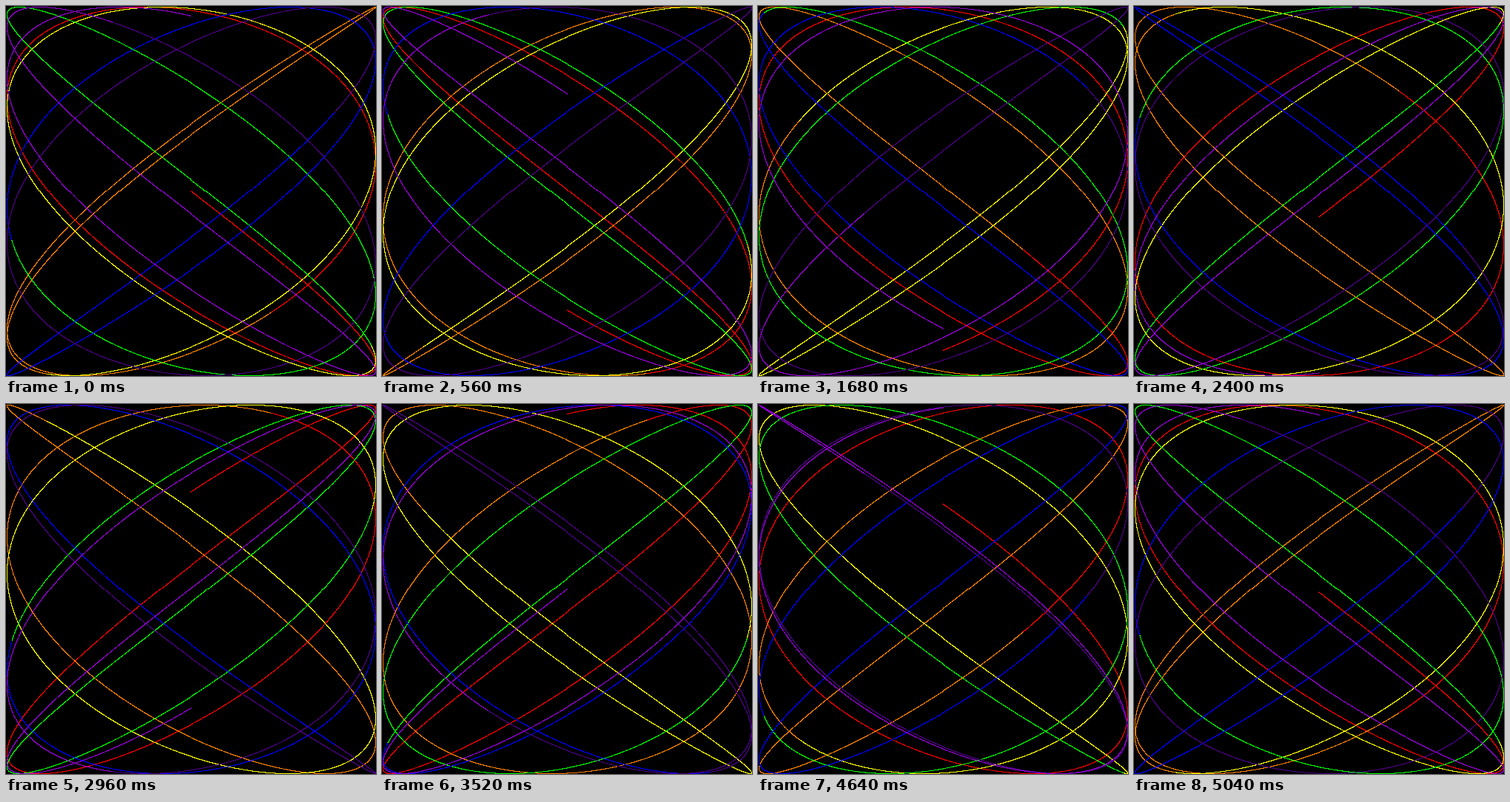
An HTML page with a canvas that plays this animation: 501x501 px, repeating every 5120 ms.

```html
<!DOCTYPE html>
<html lang="en">
<head>
<meta charset="utf-8">
<title>Rainbow Lissajous</title>
<style>
  html, body { margin: 0; width: 100%; height: 100%; overflow: hidden; background: #000; }
  canvas { display: block; }
</style>
</head>
<body>
<canvas id="stage" width="501" height="501"></canvas>
<script>
const RADIUS = 250;
const SIZE = 2 * RADIUS + 1;
const T_END = 10 * 2 * Math.PI;
const T_STEP = 0.001;
const FREQUENCY = 0.78;
const PHASE_STEP = 0.1;
const STEPS = 64;
const STEP_MS = 80;
const BLACK = 0xff000000;
const RAINBOW = [0xff0000, 0xff7f00, 0xffff00, 0x00ff00, 0x0000ff, 0x4b0082, 0x9400d3].map(toPixel);

const ctx = document.getElementById('stage').getContext('2d');
const image = ctx.createImageData(SIZE, SIZE);
const pixels = new Uint32Array(image.data.buffer);

// RGB to the little-endian ABGR layout of the pixel buffer
function toPixel(rgb) {
  return (BLACK | (rgb & 0xff) << 16 | (rgb & 0xff00) | rgb >> 16) >>> 0;
}

// Truncation toward zero keeps row and column 0 empty
const toGrid = v => RADIUS + Math.trunc(v * RADIUS + 0.5);

function draw(step) {
  const phase = step * PHASE_STEP;
  pixels.fill(BLACK);
  for (let t = 0; t < T_END; t += T_STEP) {
    const x = toGrid(Math.sin(t));
    const y = toGrid(Math.sin(t * FREQUENCY + phase));
    pixels[y * SIZE + x] = RAINBOW[Math.floor(t / T_END * RAINBOW.length)];
  }
  ctx.putImageData(image, 0, 0);
}

let shown = -1;
function tick() {
  const step = Math.floor(performance.now() / STEP_MS) % STEPS;
  if (step !== shown) draw(shown = step);
  requestAnimationFrame(tick);
}
tick();
</script>
</body>
</html>
```
